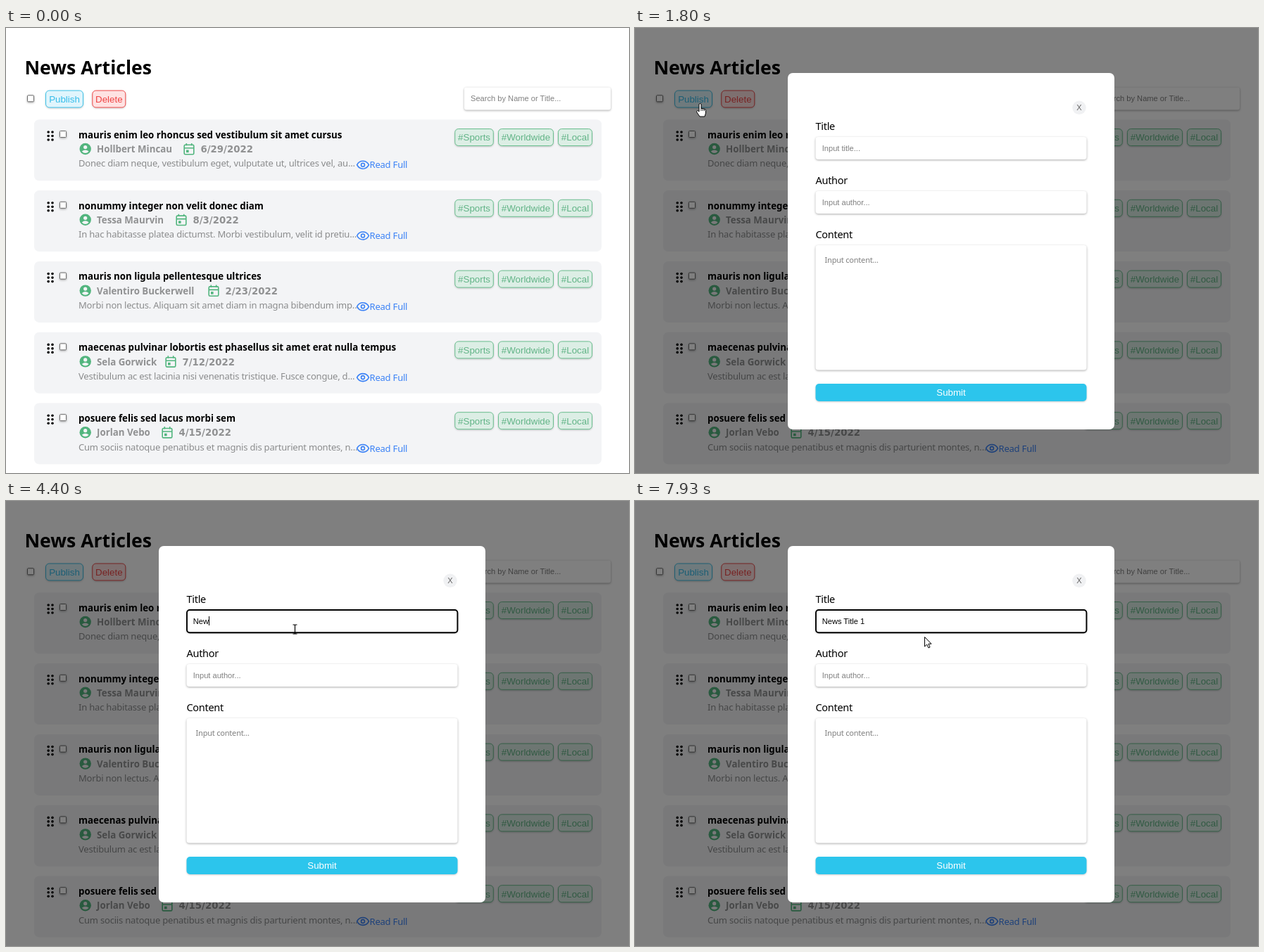
An HTML page that plays this animation: 885 by 633 pixels, repeating every 8 s.

```html
<!DOCTYPE html>
<html lang="en">
<head>
<meta charset="utf-8">
<title>News Articles</title>
<style>
  html, body { margin: 0; width: 100%; height: 100%; overflow: hidden; background: #fff; }
  svg { display: block; width: 885px; height: 633px; }
  text { white-space: pre; }
  .heading { font: bold 26.6px "Noto Sans", sans-serif; }
  .title, .name { font: bold 13.3px "Noto Sans", sans-serif; }
  .date { font: bold 13.3px "DejaVu Sans", sans-serif; }
  .name, .date { fill: #909192; }
  .body, .link { font: 13px "Noto Sans", sans-serif; letter-spacing: -.2px; fill: #8b8c8d; }
  .link { fill: #3b82f6; }
  .label { font: 14.5px "Noto Sans", sans-serif; letter-spacing: -.3px; }
  .button { font: 13.33px "Liberation Sans", Arial, sans-serif; }
  .input { font: 11.11px "Liberation Sans", Arial, sans-serif; }
  .area { font: 11px "Noto Sans", sans-serif; letter-spacing: -.2px; }
  .hint { fill: #808080; }
  .raised { filter: drop-shadow(0 1px 1.5px #0005); }
  .soft { filter: drop-shadow(0 1px 1px #0003); }
  .line { fill: none; stroke-width: 1.6; }
</style>
</head>
<body>
<svg id="stage" viewBox="0 0 885 633"></svg>
<script>
const LOOP = 8000, STEP = 1000 / 15, BLINK = 530;
const GREEN = '#52b57e';

const articles = [
  ['mauris enim leo rhoncus sed vestibulum sit amet cursus', 'Hollbert Mincau', '6/29/2022', 277,
    'Donec diam neque, vestibulum eget, vulputate ut, ultrices vel, au...'],
  ['nonummy integer non velit donec diam', 'Tessa Maurvin', '8/3/2022', 266,
    'In hac habitasse platea dictumst. Morbi vestibulum, velit id pretiu...'],
  ['mauris non ligula pellentesque ultrices', 'Valentiro Buckerwell', '2/23/2022', 312,
    'Morbi non lectus. Aliquam sit amet diam in magna bibendum imp...'],
  ['maecenas pulvinar lobortis est phasellus sit amet erat nulla tempus', 'Sela Gorwick', '7/12/2022', 251,
    'Vestibulum ac est lacinia nisi venenatis tristique. Fusce congue, d...'],
  ['posuere felis sed lacus morbi sem', 'Jorlan Vebo', '4/15/2022', 246,
    'Cum sociis natoque penatibus et magnis dis parturient montes, n...'],
];

const text = (x, y, cls, str, attrs = '') => `<text x="${x}" y="${y}" class="${cls}" ${attrs}>${str}</text>`;
const rect = (x, y, w, h, r, attrs) => `<rect x="${x}" y="${y}" width="${w}" height="${h}" rx="${r}" ${attrs}/>`;
const circle = (x, y, r, attrs = '') => `<circle cx="${x}" cy="${y}" r="${r}" ${attrs}/>`;
const group = (x, y, content, attrs = '') => `<g transform="translate(${x} ${y})" ${attrs}>${content}</g>`;

const checkbox = (x, y) => rect(x, y, 9, 9, 1, 'fill="#fff" stroke="#6b6b6b" class="raised"');
const button = (x, y, w, label, fill, stroke, color) =>
  rect(x, y, w, 24, 5, `fill="${fill}" stroke="${stroke}" class="soft"`) +
  text(x + w / 2, y + 16.8, 'button', label, `fill="${color}" text-anchor="middle"`);
const tag = (x, w, label) => button(x, 13.2, w, label, '#dceee5', '#6abf8f', '#62b487');
const field = (y, h) => rect(256.5, y, 385, h, 4, 'fill="#fff" class="raised"');

const userIcon = circle(0, 0, 8.2, `fill="${GREEN}"`) + circle(0, -2.5, 2.6, 'fill="#f3f4f6"') +
  '<path d="M-5 3.6Q0-.6 5 3.6Q0 8.6-5 3.6Z" fill="#f3f4f6"/>';
const calendarIcon = `<g class="line" stroke="${GREEN}">` + rect(-6.8, -6, 13.6, 13.4, 1.5, '') +
  `<path d="M-6.8-1.5H6.8M-3.7-8.4V-5M3.7-8.4V-5"/></g>` + rect(-4, 1.2, 3.6, 3.6, 0, `fill="${GREEN}"`);
const eyeIcon = '<g class="line" stroke="#3b82f6"><path d="M-8.4 0C-4.8-7.3 4.8-7.3 8.4 0C4.8 7.3-4.8 7.3-8.4 0Z"/>' +
  circle(0, 0, 2.5) + '</g>';

function card([title, name, date, dateX, body], i) {
  let dots = '';
  for (const x of [60.2, 66]) for (const y of [17.7, 23.2, 28.7]) dots += circle(x, y, 1.8);
  return group(0, 130.3 + 100.8 * i,
    rect(40, 0, 806, 87, 7, 'fill="#f3f4f6"') + dots + checkbox(76.5, 16.2) +
    text(103, 26.5, 'title', title) +
    group(112.7, 41.7, userIcon) + text(129, 46.9, 'name', name) +
    group(dateX - 17, 42, calendarIcon) + text(dateX - .5, 46.9, 'date', date) +
    text(103, 67.2, 'body', body) +
    group(507, 64.4, eyeIcon) + text(516.5, 69.2, 'link', 'Read Full') +
    tag(637.8, 54.5, '#Sports') + tag(699.5, 78, '#Worldwide') + tag(784.5, 48, '#Local'));
}

const page = text(26.5, 66, 'heading', 'News Articles') + checkbox(30.5, 95.8) +
  button(56.5, 89, 53, 'Publish', '#e0f5fc', '#3cc3ea', '#35bdea') +
  button(122.8, 89, 47, 'Delete', '#fee2e2', '#ef4a4a', '#ef4444') +
  rect(651, 84.5, 208, 32, 3, 'fill="#fff" class="raised"') +
  text(660, 104, 'input hint', 'Search by Name or Title...') +
  articles.map(card).join('');

const modal = rect(0, 0, 885, 633, 0, 'fill="#000" opacity=".5"') +
  rect(217, 64, 464, 507, 7, 'fill="#fff"') +
  circle(631, 113.3, 9.7, 'fill="#f0f1f3"') +
  text(631, 117.2, 'input', 'X', 'fill="#666" text-anchor="middle"') +
  text(256.5, 145, 'label', 'Title') + field(155, 32) +
  rect(257, 155, 384.4, 32.2, 4, 'id="focus" fill="none" stroke="#000" stroke-width="1.9"') +
  text(265.7, 174.5, 'input', '', 'id="value"') +
  rect(0, 164, 1, 13, 0, 'id="caret"') +
  text(256.5, 222, 'label', 'Author') + field(232, 32) + text(265.7, 251.7, 'input hint', 'Input author...') +
  text(256.5, 299, 'label', 'Content') + field(309, 177.5) + text(269.5, 334, 'area hint', 'Input content...') +
  rect(256.5, 506, 385, 25, 5, 'fill="#2cc5ec" class="soft"') +
  text(449, 523.2, 'button', 'Submit', 'fill="#fff" text-anchor="middle"');

const pointers = {
  arrow: '<path d="M.5.5V14L3.7 11 5.9 15.9 8 15 5.9 10.2H10Z" fill="#fff" stroke="#000"/>',
  beam: '<path d="M-3-6.5H-1Q0-6.5 0-5.5V5.5Q0 6.5-1 6.5H-3M3-6.5H1Q0-6.5 0-5.5M0 5.5Q0 6.5 1 6.5H3" fill="none" stroke="#000" stroke-width="1.2"/>',
  hand: '<path d="M-1 11V2A1.5 1.5 0 0 1 2 2V7L7 8Q8.5 8.4 8.5 10V14L7 19H0L-4.3 12.5Q-5-10.8-3.6 10.5T-1 12.5Z" fill="none"/>' +
    '<path d="M-1 12V2A1.5 1.5 0 0 1 2 2V7.2L7 8.3Q8.6 8.8 8.5 10.5V14L7 19H0L-4.2 12.8C-5 11.2-3.4 10.2-2.4 10.8Z" fill="#fff" stroke="#000"/>' +
    '<path d="M2 7V11M4.3 8V11M6.5 8.5V11" stroke="#000" stroke-width=".8"/>',
};

stage.innerHTML = page + `<g id="dialog">${modal}</g><g id="pointer"></g>`;
const [dialog, focusRing, valueText, caret, pointer] =
  ['dialog', 'focus', 'value', 'caret', 'pointer'].map(id => document.getElementById(id));

const path = [
  [470, 757, 579], [1270, 146, 147], [1530, 92, 107], [2060, 92, 107], [2670, 313, 178],
  [3070, 313, 178], [3330, 407, 187], [3470, 410.5, 182.5], [7740, 410.5, 182.5], [7930, 411, 193],
];
const shapes = [
  [470, 'arrow'], [1200, 'beam'], [1400, 'hand'], [2100, 'arrow'], [2600, 'beam'],
  [3300, 'arrow'], [3400, 'beam'], [7900, 'arrow'],
];
const typing = [
  [2930, ''], [4130, 'N'], [4200, 'Ne'], [4400, 'New'], [4870, 'Ne'], [5000, 'N'], [5270, 'Nw'], [5530, 'N'],
  [5670, 'Ne'], [5800, 'New'], [6070, 'News'], [6330, 'News '], [6530, 'News T'], [6670, 'News Ti'],
  [6870, 'News Tit'], [7000, 'News Titl'], [7130, 'News Title'], [7330, 'News Title '], [7400, 'News Title 1'],
];

const latest = (list, t) => list.findLast(entry => entry[0] <= t);
const show = (el, visible) => el.setAttribute('visibility', visible ? 'inherit' : 'hidden');

function position(t) {
  const from = latest(path, t), to = path[path.indexOf(from) + 1];
  if (!to) return from.slice(1);
  const u = (t - from[0]) / (to[0] - from[0]), e = u * u * (3 - 2 * u);
  return [1, 2].map(k => from[k] + (to[k] - from[k]) * e);
}

function draw(t) {
  show(dialog, t >= 1800);

  const key = latest(typing, t), value = key ? key[1] : '';
  valueText.textContent = value || 'Input title...';
  valueText.setAttribute('fill', value ? '#000' : '#808080');
  const width = value ? valueText.getComputedTextLength() : 0;
  caret.setAttribute('x', Math.round(265.7 + width));
  show(focusRing, key && t >= 1800);
  show(caret, key && Math.floor((t - key[0]) / BLINK) % 2 === 0);

  const shape = latest(shapes, t);
  pointer.innerHTML = shape ? group(...position(t), pointers[shape[1]]) : '';
}

function frame(now) {
  const step = Math.floor((now % LOOP) / STEP + .07);
  draw(Math.round(step * STEP / 10) * 10 % LOOP);
  requestAnimationFrame(frame);
}
requestAnimationFrame(frame);
</script>
</body>
</html>
```
